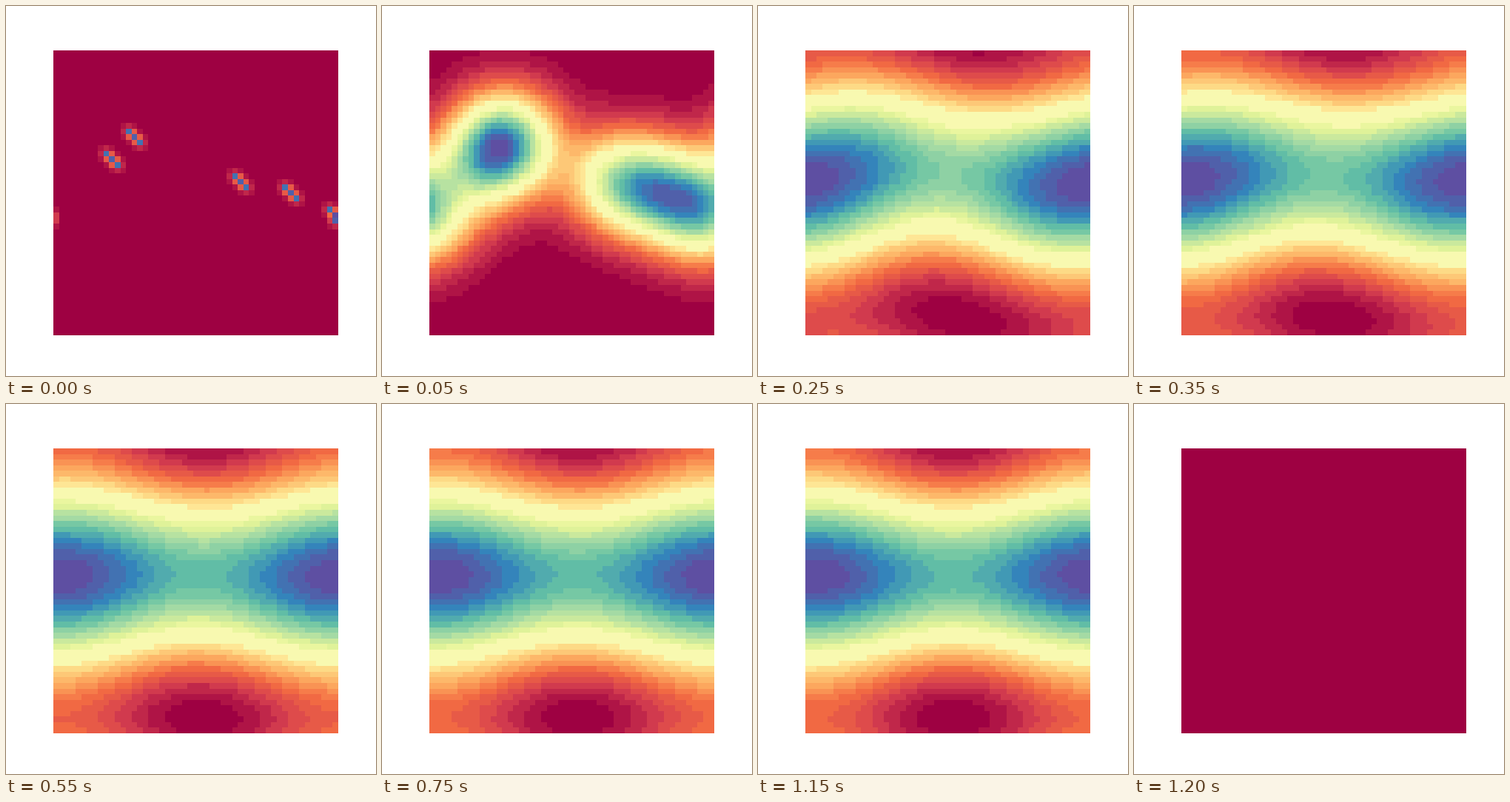
A matplotlib script for the animation above (2.55 s loop, 500x500 px).

```python
import numpy as np
import matplotlib.pyplot as plt
from matplotlib.animation import FuncAnimation
from matplotlib.colors import ListedColormap

SIZE = 51                # cells per side, edges wrap around
FRAMES = 51
INTERVAL = 50            # ms
FLAT_FROM = 24           # the field counts as settled from here on
STEPS_PER_FRAME = 172
SIDE, DIAGONAL = 0.058, 0.029    # share passed on to each neighbour
SEEDS = [(15, 14), (19, 10), (23, 33), (25, 42), (29, 50)]   # row, column


def starting_field():
    field = np.zeros((SIZE, SIZE))
    for row, col in SEEDS:
        for k in (-1, 0, 1):
            field[row + k, min(col + k, SIZE - 1)] = 1
    return field


def banded_spectral(levels=32):
    colors = plt.get_cmap("Spectral")(np.linspace(0, 1, levels))
    middle = levels // 2
    colors[middle - 2:middle + 2, :3] = np.array([248, 249, 176]) / 255
    return ListedColormap(colors)


# One diffusion step multiplies each Fourier mode by a fixed factor.
wave = np.cos(2 * np.pi * np.arange(SIZE) / SIZE)
cos_y, cos_x = wave[:, None], wave[None, :]
STEP_FACTOR = (1 - 4 * SIDE - 4 * DIAGONAL
               + 2 * SIDE * (cos_x + cos_y)
               + 4 * DIAGONAL * cos_x * cos_y)
SPECTRUM = np.fft.fft2(starting_field())


def field_at(frame):
    if frame >= FLAT_FROM:
        return np.zeros((SIZE, SIZE))
    steps = 1 + frame * STEPS_PER_FRAME
    modes = SPECTRUM * STEP_FACTOR ** steps
    modes[0, 0] = 0
    field = np.fft.ifft2(modes).real
    field -= field.min()
    return field / field.max()


fig, ax = plt.subplots(figsize=(5, 5), dpi=100, facecolor="white")
ax.axis("off")
image = ax.imshow(field_at(0), cmap=banded_spectral(), vmin=0, vmax=1,
                  interpolation="nearest")


def update(frame):
    image.set_data(field_at(frame))
    return [image]


animation = FuncAnimation(fig, update, frames=FRAMES, interval=INTERVAL,
                          repeat=True, repeat_delay=0)
plt.show()
```
